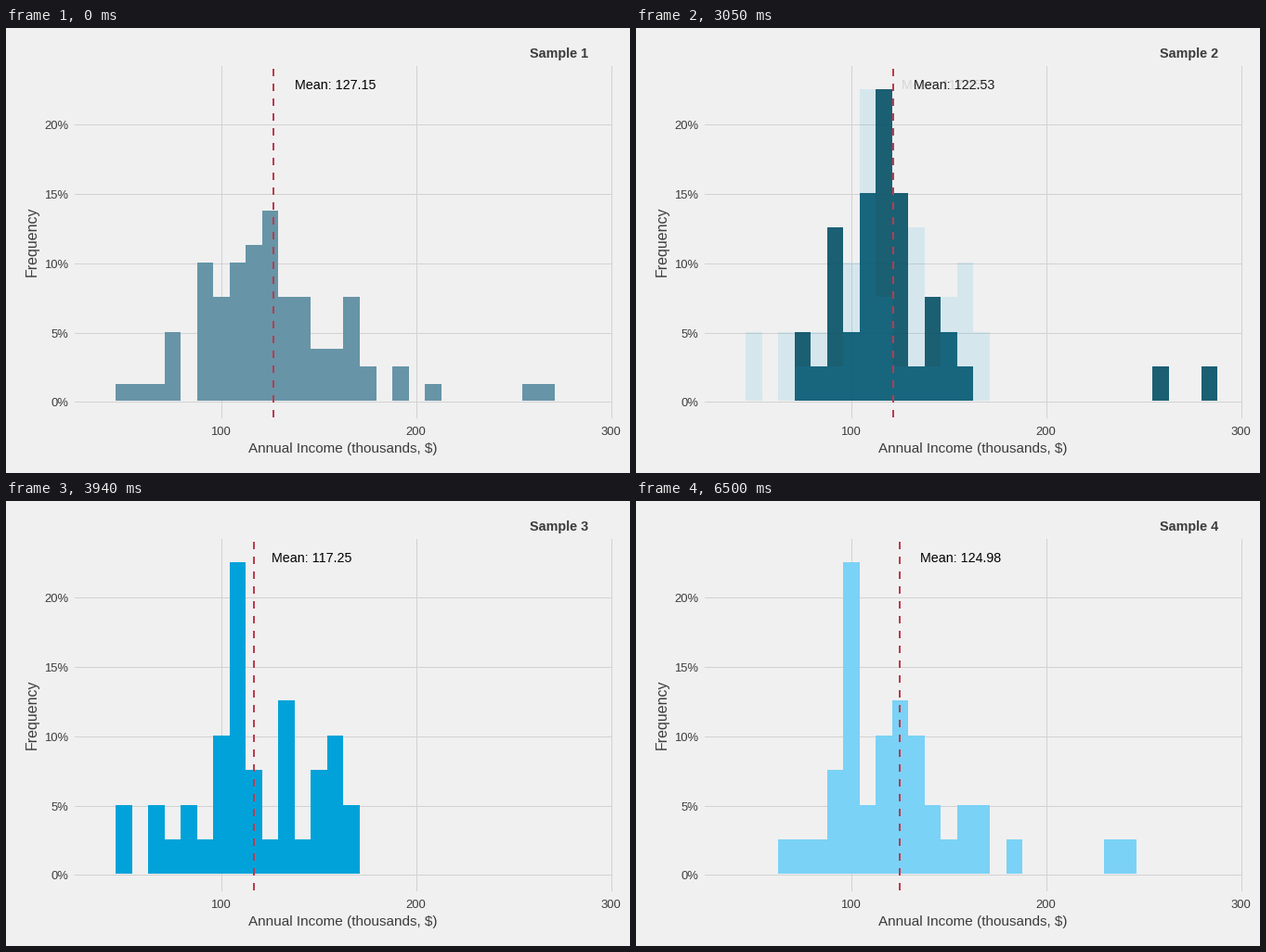
Write a matplotlib script that moves like this. It is 672x480 px and loops after 8000 ms.

```python
import matplotlib.pyplot as plt
import numpy as np
from matplotlib.animation import FuncAnimation

W, H, DPI = 672, 480, 96
LOOP, TICK = 8000, 20
STARTS = (500, 3050, 5610)      # when each cross-fade begins, ms
STEP, STEPS = 111, 9            # cross-fade step length and count
LEFT, RIGHT, TOP, BOTTOM = 74, 652, 41, 420
GREY, INK, RED = "#D2D2D2", "#3C3C3C", "#BC3A4F"

# mean, colour, first bin, bin heights in units of 1.25 %
SAMPLES = [
    (127.15, "#6794A7", 0, [1, 1, 1, 4, 0, 8, 6, 8, 9, 11, 6, 6, 3, 3, 6, 2,
                            0, 2, 0, 1, 0, 0, 0, 0, 0, 1, 1]),
    (122.53, "#014D64", 3, [4, 2, 10, 4, 12, 18, 12, 2, 6, 4, 2] + [0] * 11
                           + [2, 0, 0, 2]),
    (117.25, "#01A2D9", 0, [4, 0, 4, 2, 4, 2, 8, 18, 6, 2, 10, 2, 6, 8, 4]),
    (124.98, "#7AD2F6", 2, [2, 2, 2, 6, 18, 4, 8, 10, 8, 4, 2, 4, 4, 0, 2,
                            0, 0, 0, 0, 0, 2, 2]),
]


def x_px(income):
    return 231.22 + 2.1 * (income - 100)


def y_px(percent):
    return np.round(402.4 - 14.96 * np.asarray(percent))


def pt(px):
    return px * 72 / DPI


plt.rcParams["font.family"] = "Liberation Sans"
fig = plt.figure(figsize=(W / DPI, H / DPI), dpi=DPI, facecolor="#F0F0F0")
ax = fig.add_axes([0, 0, 1, 1])
ax.axis("off")


def label(x, y, text, px, color=INK, ha="center", **kw):
    return ax.text(x, y, text, fontsize=pt(px), color=color, ha=ha,
                   va="baseline", **kw)


# grid and axis labels
grid = dict(colors=GREY, linewidth=pt(1), antialiased=False, zorder=0)
for percent in range(0, 25, 5):
    y = y_px(percent)
    ax.hlines(y + 0.5, LEFT, RIGHT, **grid)
    label(67, y + 6, f"{percent}%", 13, ha="right")
for income in (100, 200, 300):
    x = np.floor(x_px(income))
    ax.vlines(x + 0.5, TOP, BOTTOM, **grid)
    label(x, 439, str(income), 13)
label(362.5, 458, "Annual Income (thousands, $)", 15.2)
label(33, 230.5, "Frequency", 16, rotation=90, rotation_mode="anchor")
title = label(563.5, 32, "", 14.4, ha="left", weight="bold")

# one histogram and one mean label per sample
layers = []
for mean, color, first, units in SAMPLES:
    edges = np.round(118.2 + 17.52 * (first + np.arange(len(units) + 1)))
    bars = ax.stairs(y_px(1.25 * np.array(units)), edges, baseline=y_px(0),
                     fill=True, color=color, linewidth=0, antialiased=False)
    note = label(x_px(1.25 * mean), 66, f"Mean: {mean:.2f}", 14.2, "black")
    layers.append((bars, note))

mean_line, = ax.plot([0, 0], [BOTTOM, TOP], color=RED, linewidth=pt(2),
                     linestyle=(0, (4, 4)))
ax.set(xlim=(0, W), ylim=(H, 0))


def state(t):
    """Current sample and number of fade steps taken towards the next."""
    for i, start in enumerate(STARTS):
        if t < start:
            return i, 0
        step = int((t - start) // STEP) + 1
        if step < STEPS:
            return i, step
    return len(STARTS), 0


def draw(n):
    i, step = state(n * TICK + 12)
    p = step / STEPS
    j = min(i + 1, len(SAMPLES) - 1)
    for k, parts in enumerate(layers):
        alpha = 1 - p if k == i else p if k == j else 0
        for part in parts:
            part.set_visible(alpha > 0)
            part.set_alpha(alpha)
    x = (1 - p) * x_px(SAMPLES[i][0]) + p * x_px(SAMPLES[j][0])
    mean_line.set_xdata([np.round(x)] * 2)
    title.set_text(f"Sample {(j if step > 5 else i) + 1}")
    return [mean_line, title]


anim = FuncAnimation(fig, draw, frames=LOOP // TICK, interval=TICK,
                     repeat=True, repeat_delay=0)
plt.show()
```
